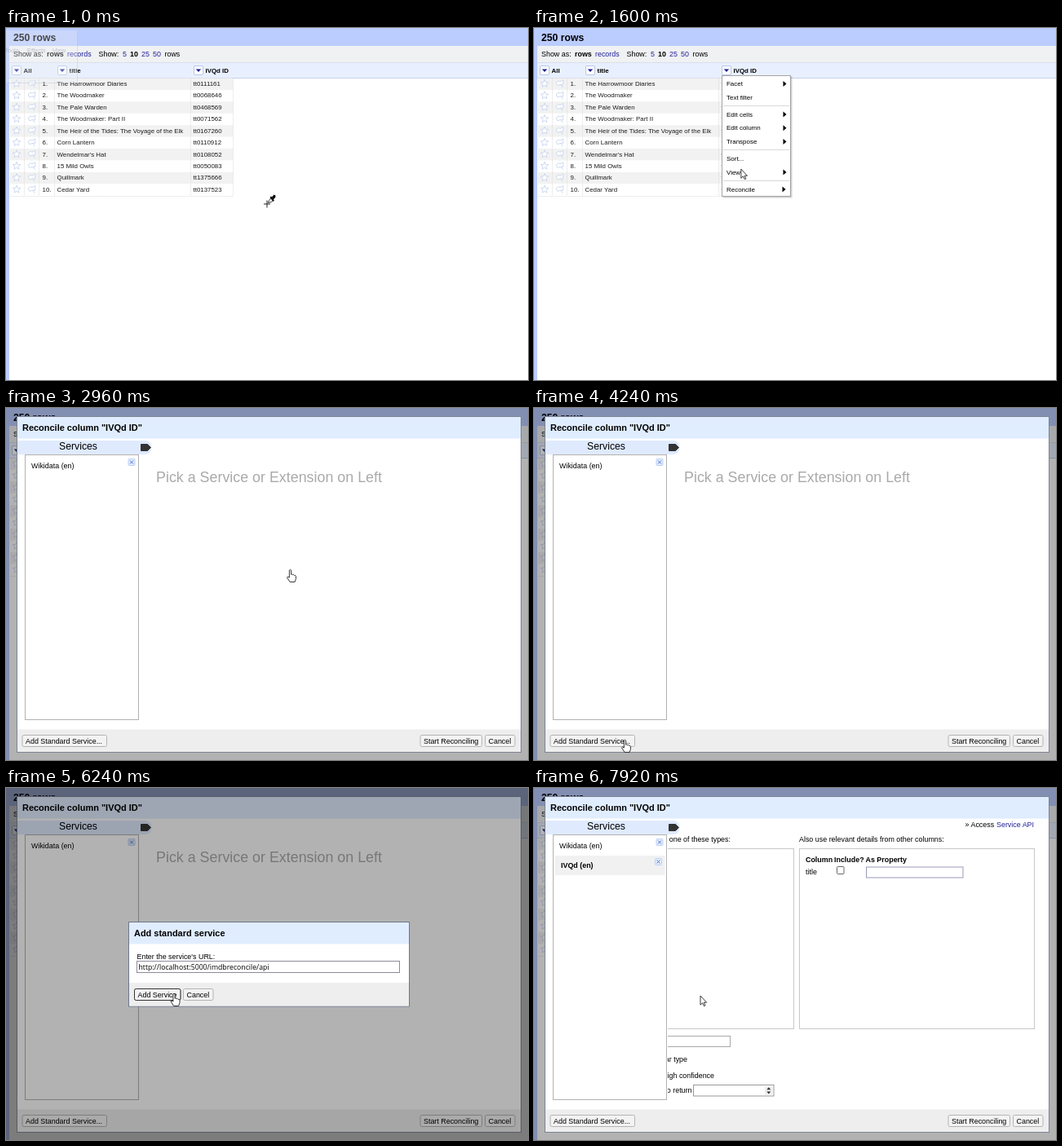
Write an HTML page that moves like this. It is 640 px wide and 432 px high and loops after 8000 ms.

```html
<!DOCTYPE html>
<html lang="en">
<head>
<meta charset="utf-8">
<title>Adding a reconciliation service</title>
<style>
html, body { margin: 0; width: 100%; height: 100%; overflow: hidden; background: #fff; }
svg { display: block; width: 100%; height: 100%; font-family: "Liberation Sans", Arial, sans-serif; }
text { white-space: pre; }
</style>
</head>
<body>
<svg id="stage" viewBox="0 0 640 432"></svg>
<script>
const LOOP = 8000, STEP = 80;
const UI = 8.92, CELL = 7.9, MENU = 7.97;
const NAVY = '#22229a', INK = '#1c1c1c', COLUMN = 'IVQd';

const rect = (x, y, w, h, fill, more = '') =>
  `<rect x="${x}" y="${y}" width="${w}" height="${h}" fill="${fill}" ${more}/>`;
const box = (x, y, w, h, fill, stroke, more = '') =>
  rect(x + .5, y + .5, w - 1, h - 1, fill, `stroke="${stroke}" ${more}`);
const line = (x1, y1, x2, y2, color, more = '') =>
  `<path d="M${x1} ${y1}L${x2} ${y2}" stroke="${color}" fill="none" ${more}/>`;
const path = (d, fill, more = '') => `<path d="${d}" fill="${fill}" ${more}/>`;
// cy is the middle of the capitals
const text = (s, x, cy, size = UI, more = '') =>
  `<text x="${x}" y="${(cy + size * .35).toFixed(2)}" font-size="${size}" ${more}>${s}</text>`;
const bold = (s, x, cy, size = UI) => text(s, x, cy, size, 'font-weight="700"');
const cell = (s, x, cy) => text(s, x, cy, CELL, `fill="${INK}"`);
const link = (s, x, cy) => text(s, x, cy, UI, `fill="${NAVY}"`);
const group = (id, body) => `<g id="${id}">${body}</g>`;
const button = (s, x, y, w) =>
  box(x, y, w, 15, '#f3f3f3', '#b4b4b4', 'rx="2"') + text(s, x + 4.5, y + 7.5);

const titles = [
  ['The Harrowmoor Diaries', 'tt0111161'],
  ['The Woodmaker', 'tt0068646'],
  ['The Pale Warden', 'tt0468569'],
  ['The Woodmaker: Part II', 'tt0071562'],
  ['The Heir of the Tides: The Voyage of the Elk', 'tt0167260'],
  ['Corn Lantern', 'tt0110912'],
  ["Wendelmar's Hat", 'tt0108052'],
  ['15 Mild Owls', 'tt0050083'],
  ['Quillmark', 'tt1375666'],
  ['Cedar Yard', 'tt0137523']
];

function star(x, y) {
  let d = '';
  for (let i = 0; i < 10; i++) {
    const a = Math.PI * (i / 5 - .5), r = i % 2 ? 2.2 : 5;
    d += `${i ? 'L' : 'M'}${(x + r * Math.cos(a)).toFixed(1)} ${(y + r * Math.sin(a)).toFixed(1)}`;
  }
  return path(d + 'Z', '#fff', 'stroke="#c3d0ec" stroke-width=".8"');
}

const flag = (x, y) => path(
  `M${x - 4} ${y - 1}l3 -2.500l2 1l4 -2l-.5 6l-3.500 -.5l-3 1.500zM${x + 2} ${y + 1.5}l2.500 3.500`,
  '#fff', 'stroke="#c3d0ec" stroke-width=".8"');

const dropdown = x =>
  box(x - 6, 46, 12, 12, '#fff', '#b9c6e6', 'rx="1.500"') +
  path(`M${x - 3.2} 50.500h6.400l-3.200 3.600z`, '#1c1c8c');

function grid() {
  let s = rect(0, 0, 640, 432, '#fff') + rect(4, 22, 636, 21, '#f0f1f3') +
    rect(4, 43, 636, 18.5, '#e8f0ff') + rect(0, 0, 640, 22, '#bbccff') +
    rect(0, 0, 4, 432, '#bbccff') +
    line(4, 42.5, 640, 42.5, '#d9e0ee') + line(4, 61.5, 640, 61.5, '#c4d0ea');
  s += bold('250 rows', 9, 11.8, 12.2) + text('Show as:', 9, 32) + bold('rows', 50, 32) +
    link('records', 75, 32) + text('Show:', 113.5, 32) + link('5', 143, 32) +
    bold('10', 152, 32) + link('25', 166, 32) + link('50', 180, 32) + text('rows', 194.5, 32);
  s += [13, 69, 236].map(dropdown).join('') + bold('All', 21.5, 52, CELL) +
    bold('title', 77.5, 52, CELL) + bold(COLUMN + ' ID', 244.5, 52, CELL);
  titles.forEach(([name, id], i) => {
    const y = 68.3 + i * 14.42;
    if (i % 2 === 0) s += rect(5, y - 6.8, 273.5, 14.4, '#f2f2f2');
    s += star(13, y) + flag(31, y) + cell(i + 1 + '.', 44.5, y) +
      cell(name, 62.5, y) + cell(id, 229.5, y);
  });
  for (const x of [22.5, 40.5, 59.5, 226.5, 278.5])
    s += line(x, 62, x, 206, '#dcdcdc', 'stroke-dasharray="1 1"');
  return s + line(5, 206.5, 279, 206.5, '#dcdcdc', 'stroke-dasharray="1 1"');
}

// items: [label, centre, has submenu]; seps: y of the rules
function menu(x, y, w, h, items, seps) {
  return rect(x + 1.5, y + 1.5, w, h, '#000', 'opacity=".18"') + box(x, y, w, h, '#fff', '#a4a4a4') +
    seps.map(v => line(x + 2, v, x + w - 2, v, '#d8d8d8')).join('') +
    items.map(([s, cy, sub]) => text(s, x + 6, cy, MENU) +
      (sub ? path(`M${x + w - 9.5} ${cy - 3.5}v7l4 -3.500z`, '#000') : '')).join('');
}

const columnMenu = menu(230, 58, 85, 149, [
  ['Facet', 68.5, 1], ['Text filter', 85], ['Edit cells', 106, 1], ['Edit column', 122.7, 1],
  ['Transpose', 139.5, 1], ['Sort...', 160], ['View', 177, 1]
], [95.5, 149.5, 187.5]) + group('hover', rect(231, 189.5, 83, 16.5, '#dfe9f8')) +
  text('Reconcile', 236, 198, MENU) + path('M304.500 194.500v7l4 -3.500z', '#000');

const subMenu = menu(314, 189.5, 119, 114, [
  ['Start reconciling...', 199], ['Facets', 219.5, 1], ['Actions', 236.5, 1],
  ['Copy reconciliation data...', 257.3], ['Use values as identifiers', 273.7],
  ['Add entity identifiers column', 294.5]
], [209.5, 246.5, 284.5]);

const shade = rect(0, 0, 640, 432, '#000', 'opacity=".3"');
const closeBox = (x, y) => box(x - 4.5, y - 4.5, 9, 9, '#e2ecff', '#bfd0f2', 'rx="1"') +
  path(`M${x - 2} ${y - 2}l4 4m0 -4l-4 4`, 'none', 'stroke="#5577cc"');
const tail = (s, x, cy) => text(s, x, cy, UI, 'text-anchor="end"');

const details =
  tail('Reconcile each cell to an entity of one of these types:', 241, 62.7) +
  box(30, 74, 289, 222, '#fff', '#c8c8c8') +
  text('Also use relevant details from other columns:', 325, 62.7) +
  box(325, 74, 289, 222, '#fff', '#c8c8c8') +
  text('» Access', 528.5, 45) + link('Service API', 567, 45) +
  bold('Column', 333, 87.5) + bold('Include?', 368, 87.5) + bold('As Property', 406.5, 87.5) +
  text('title', 333, 102.5) +
  box(371, 96, 9.5, 10, '#fff', '#666', 'rx="1"') + box(407, 96.5, 119.5, 14, '#fff', '#9a9ab8') +
  box(100, 304, 141, 14, '#fff', '#a8a8a8') +
  tail('Reconcile against no particular type', 188, 333) +
  tail('Auto-match candidates with high confidence', 221, 352.5) +
  tail('Maximum number of candidates to return', 193.5, 371) +
  box(195, 364, 99.5, 14.5, '#fff', '#999') + rect(283, 366, 9.5, 10.5, '#eee') +
  path('M285.300 370.300h5l-2.500 -3zM285.300 372.500h5l-2.500 3z', '#333');

const dialog = shade + box(13, 10, 619, 413, '#fff', '#7d8494') +
  rect(14, 11, 617, 26.5, '#e0edff') + rect(14, 394.5, 617, 27.5, '#eeeeee') +
  bold(`Reconcile column "${COLUMN} ID"`, 20, 23.7, 10.97) +
  group('prompt', text('Pick a Service or Extension on Left', 184, 84.7, 17.86, 'fill="#aaa"')) +
  group('details', details) +
  rect(14, 57, 150, 326, '#fff') +
  path('M14 40H170Q178.500 40 178.500 48.500T170 57H14Z', '#dfeaff') +
  text('Services', 65, 47, 12.25) +
  path('M165.500 44.500h8l4 4l-4 4h-8z', '#333', 'stroke="#333" stroke-linejoin="round"') +
  box(23, 57, 140, 326, '#fff', '#b2b2b2') +
  text('Wikidata (en)', 31, 70.5) + closeBox(154, 66.5) +
  group('added', rect(26, 83, 134.5, 24, '#f1f1f1') + bold(COLUMN + ' (en)', 33, 94.7) + closeBox(152.5, 90.5)) +
  button('Add Standard Service...', 19.5, 401, 104.5) +
  button('Start Reconciling', 507.5, 401, 76.5) + button('Cancel', 587, 401, 37.5);

const FIELD = `font-family="'Open Sans', 'Noto Sans', sans-serif"`;
const popup = shade + box(150, 164, 345, 104.5, '#fff', '#6d7890') +
  rect(151, 165, 343, 26.5, '#e0edff') + rect(151, 239, 343, 28.5, '#eeeeee') +
  bold('Add standard service', 157, 178, 10.97) +
  text("Enter the service's URL:", 160.5, 206.8) + box(160, 212, 323, 15, '#fff', '#8c8c9c') +
  group('blank', rect(162, 214, 27.5, 11, '#0078d7') + text('http://', 162.5, 219.7, 8.7, FIELD + ' fill="#fff"')) +
  group('url', text('http://localhost:5000/imdbreconcile/api', 162.5, 219.7, 8.7, FIELD)) +
  button('Add Service', 157, 246, 57.5) + button('Cancel', 217, 246, 37.5) +
  group('focus', box(157, 246, 57.5, 15, 'none', '#333', 'rx="2"'));

// faint leftover of a tool window at the very start
const ghost = rect(0, 3, 88, 65, '#eceef2', 'opacity=".3"') +
  line(87.5, 3, 87.5, 68, '#8090b0', 'opacity=".2"') + line(0, 67.5, 88, 67.5, '#8090b0', 'opacity=".2"') +
  ['Tools', 'Effects', 'View'].map((s, i) => text(s, [-2, 26, 57][i], 27.5, 7.5, 'fill="#8a93a8" opacity=".5"')).join('');

const edge = 'stroke="#222" stroke-width=".9" stroke-linejoin="round"';
const cursors =
  group('pen', path('M-4 0H4M0 -4.500V4.500', 'none', 'stroke="#222"') +
    path('M1.500 -1.500L2.500 -4.500L5.500 -7.500L8 -5L5 -2.300Z', '#fff', edge) +
    path('M3.500 -8L5 -9.500L6 -8.500L8.500 -11.500L10.500 -10.500L10.300 -8L8 -5.700L9 -4.500L7.500 -3Z', '#111')) +
  group('arrow', path('M0 0V11.200L2.600 8.800L4.400 12.600L6 11.900L4.300 8.200H7.600Z', '#fff', edge)) +
  group('hand', path('M-1.100 1Q0 -.6 1.100 1V6.300Q2.200 5.200 3 6.800Q4.300 5.800 5 7.400Q6.600 6.800 7 8.600V11.500L5.600 15.500H-.4L-4 9.800Q-3.600 8 -1.100 10Z', '#fff', edge));

const stage = document.getElementById('stage');
stage.innerHTML = grid() + group('ghost', ghost) + group('menu', columnMenu) + group('sub', subMenu) +
  group('dialog', dialog) + group('popup', popup) + group('cursor', cursors);
const parts = {};
stage.querySelectorAll('g[id]').forEach(g => parts[g.id] = g);

// visible from, until
const spans = {
  ghost: [0, 80], menu: [1120, 2800], hover: [1760, 2800], sub: [1840, 2800],
  dialog: [2800, LOOP], prompt: [2800, 6880], details: [6880, LOOP], added: [6400, LOOP],
  popup: [4480, 6400], blank: [4480, 4960], url: [4960, 6400], focus: [6160, 6400]
};

// time, x, y
const stops = [
  [0, 320, 216], [80, 320, 216], [800, 231.5, 49.5], [1120, 231.5, 49.5], [1760, 258, 196], [1920, 266, 198],
  [2320, 297.5, 216.5], [2640, 348.5, 198], [3280, 348.5, 198], [4240, 111.5, 407],
  [5120, 111.5, 407], [5920, 206, 252], [6400, 206, 252], [6480, 204, 255], [LOOP, 204, 255]
];

const shapes = [[0, 'pen'], [80, 'arrow'], [800, 'hand'], [1120, 'arrow'], [2560, 'hand'],
  [3040, 'arrow'], [4160, 'hand'], [5200, 'arrow'], [5840, 'hand'], [6400, 'arrow']];

function pointer(t) {
  const i = Math.max(1, stops.findIndex(s => s[0] > t));
  const [t0, x0, y0] = stops[i - 1], [t1, x1, y1] = stops[i];
  const u = (t - t0) / (t1 - t0), k = u * u * (3 - 2 * u);
  return [x0 + (x1 - x0) * k, y0 + (y1 - y0) * k];
}

const show = (id, on) => parts[id].setAttribute('display', on ? 'inline' : 'none');

function draw(t) {
  for (const id in spans) show(id, t >= spans[id][0] && t < spans[id][1]);
  const shape = shapes.filter(s => s[0] <= t).pop()[1];
  for (const id of ['pen', 'arrow', 'hand']) show(id, id === shape);
  parts.cursor.setAttribute('transform', `translate(${pointer(t)})`);
}

function tick() {
  const t = performance.now() % LOOP;
  draw(Math.floor(t / STEP) * STEP);
  requestAnimationFrame(tick);
}
tick();
</script>
</body>
</html>
```
